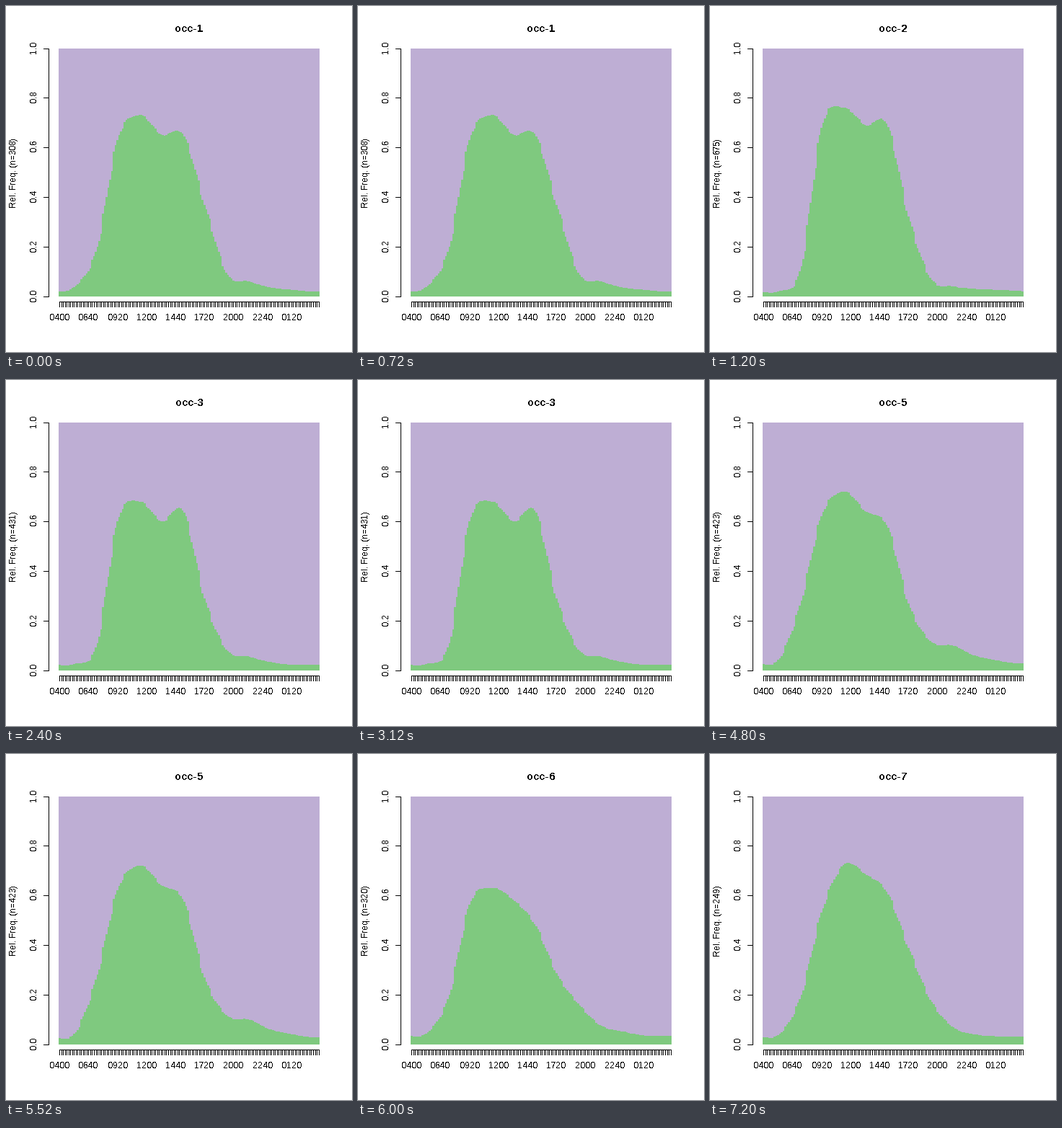
Write a matplotlib script that moves like this. It is 480x480 px and loops after 8000 ms.

```python
import numpy as np
import matplotlib.pyplot as plt
from matplotlib.animation import FuncAnimation

plt.rcParams.update({
    "font.family": "Liberation Sans",
    "text.hinting": "force_autohint",
    "text.hinting_factor": 1,
    "text.antialiased": False,
})

SIZE, DPI = 480, 96
PX = 72 / DPI
LEFT, BAR_W, BARS = 73.51, 2.5124, 144
BASE, HEIGHT = 403.12, 344.08
GREEN, PURPLE = "#7FC97F", "#BEAED4"

# Sample size and percentage at work every two hours, from 05:30 round to 03:30
GROUPS = [
    (308, "4 19 64 73 65 65 36 9 6 3.5 2.6 2"),
    (675, "2 11 69 76 69 69 31 7 4 3 2.6 2.2"),
    (431, "2.6 10 61 68 60 64 28 8 5.5 3.3 2.2 2.3"),
    (335, "1.5 11 73 82 72 69 21 7.5 4.2 2.6 1 0.9"),
    (423, "4.5 27 63 72 64 58 26 11.5 10 6 4 2.9"),
    (320, "4.6 19 57 63 58 48 28 16 7.5 5.2 3.5 3.5"),
    (249, "4 19 54 72.5 68.5 61 38 17.5 7 4 3.2 3.2"),
]


def spline(levels, t):
    """Periodic Catmull-Rom curve through evenly spaced levels."""
    k = np.floor(t).astype(int)
    u = t - k
    a, b, c, d = (levels[(k + j) % len(levels)] for j in (-1, 0, 1, 2))
    return b + u / 2 * (c - a + u * (2 * a - 5 * b + 4 * c - d
                                     + u * (3 * (b - c) + d - a)))


def bar_tops(levels):
    # People start and stop on the hour, so each hour spans only part of the
    # smooth curve and the rest is a jump to the next hour.
    hour, slot = np.divmod(np.arange(BARS), 6)
    clock = 4.5 + hour + 0.66 * (slot / 5 - 0.5)
    share = spline(levels, (clock - 5.5) / 2) / 100
    return np.floor(BASE - HEIGHT * share)


charts = [(n, bar_tops(np.array(levels.split(), float)))
          for n, levels in GROUPS]

fig = plt.figure(figsize=(SIZE / DPI, SIZE / DPI), dpi=DPI, facecolor="white")
ax = fig.add_axes([0, 0, 1, 1])
ax.set(xlim=(0, SIZE), ylim=(SIZE, 0))
ax.axis("off")

line_style = dict(colors="black", lw=PX, snap=False)


def label(x, y, text, px=12, **kw):
    return ax.text(x, y, text, fontsize=px * PX, ha="center", va="baseline",
                   rotation_mode="anchor", **kw)


# Stacked areas
edges = np.floor(LEFT + BAR_W * np.arange(BARS + 1))
ax.fill_between([edges[0], edges[-1]], 59, 403, color=PURPLE, lw=0,
                antialiased=False)
area = ax.stairs(charts[0][1], edges, baseline=403, fill=True, color=GREEN,
                 lw=0, antialiased=False)

# Vertical axis
ax.vlines(59.5, 59, 404, **line_style)
for v in np.arange(6) / 5:
    y = np.floor(BASE - HEIGHT * v)
    ax.hlines(y + 0.5, 52, 60, **line_style)
    label(42, y - 1.5, f"{v:.1f}", rotation=90)

# Time axis
ticks = np.floor(LEFT + BAR_W * (np.arange(BARS) + 0.5)) + 0.5
ax.hlines(410.5, ticks[0] - 0.5, ticks[-1] + 0.5, **line_style)
ax.vlines(ticks, 410, 418, **line_style)
for i in range(0, BARS, 16):
    minute = (240 + 10 * i) % 1440
    label(ticks[i] - 0.5, 436, f"{minute // 60:02d}{minute % 60:02d}")

title = label(254, 36, "", px=14.4, weight="bold")
ylabel = label(14, 231.5, "", rotation=90)


def update(frame):
    k = min(frame // 3, len(charts) - 1)
    n, tops = charts[k]
    area.set_data(values=tops)
    title.set_text(f"occ-{k + 1}")
    ylabel.set_text(f"Rel. Freq. (n={n})")
    return area, title, ylabel


anim = FuncAnimation(fig, update, frames=20, interval=400, repeat=True)
plt.show()
```
